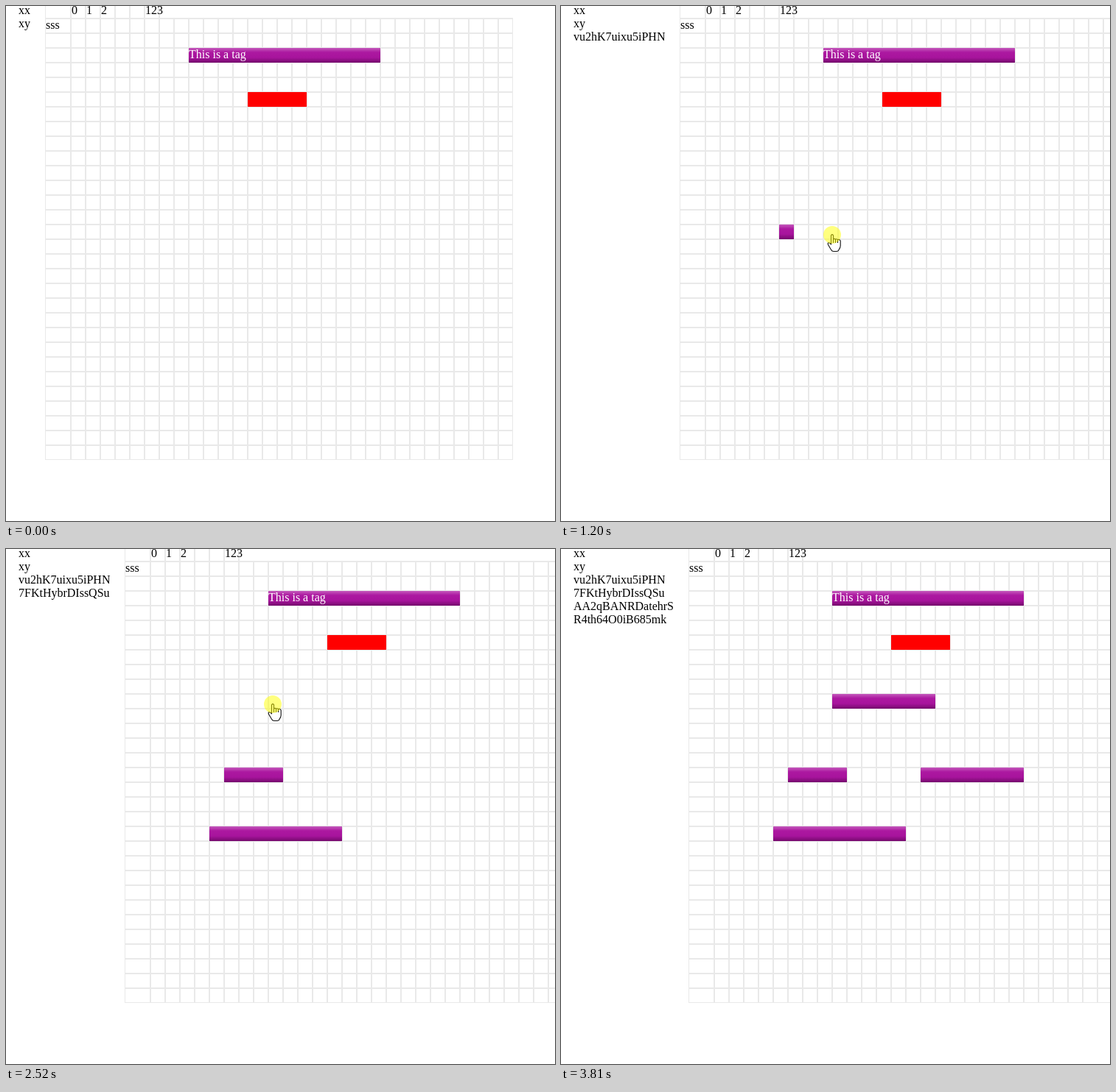
Write an HTML page that moves like this. It is 745 px wide and 700 px high and loops after 4210 ms.

```html
<!DOCTYPE html>
<html lang="en">
<head>
<meta charset="utf-8">
<title>Tag grid</title>
<style>
  html, body { margin: 0; width: 100%; height: 100%; overflow: hidden; background: #fff; }
  svg { display: block; }
  text { font: 16px "Liberation Serif", "Times New Roman", serif; white-space: pre; }
  #lines { fill: none; stroke: #e9e9e9; stroke-width: 2; }
  .tag { fill: url(#purple); }
  .cursor { fill: #fff; stroke: #111; stroke-width: 1.1; stroke-linejoin: round; stroke-linecap: round; }
</style>
</head>
<body>
<svg id="stage" width="745" height="700">
  <defs>
    <linearGradient id="purple" x2="0" y2="1">
      <stop offset="0" stop-color="#c45abc"/>
      <stop offset=".3" stop-color="#ac18a0"/>
      <stop offset=".65" stop-color="#a8149d"/>
      <stop offset="1" stop-color="#750a6d"/>
    </linearGradient>
  </defs>

  <g id="names">
    <text x="17" y="11">xx</text>
    <text x="17" y="29">xy</text>
  </g>

  <g id="table">
    <svg x="53" y="-3" width="635" height="620"><path id="lines"/></svg>
    <text x="89" y="11">0</text>
    <text x="109" y="11">1</text>
    <text x="129" y="11">2</text>
    <text x="189" y="11">123</text>
    <text x="54" y="31">sss</text>
    <rect class="tag" x="248" y="57" width="260" height="20"/>
    <text x="248" y="71" fill="#fff">This is a tag</text>
    <rect x="328" y="117" width="80" height="20" fill="#f00"/>
  </g>

  <g id="pointer">
    <g id="hand" class="cursor" transform="translate(0 -1)">
      <path d="M-1.5 1.8q1.5-2.4 3 0V7q1.6-1.4 3 .2q1.6-1.2 3 .5q1.9-1 3.7 1.3V16q-.2 2.6-1.8 4.6q-1 2.9-3.4 2.9H2q-2.4 0-3.5-2.3L-5.2 15q-1.3-2.6 .1-3.2q1.5-.4 3.6 2.2z"/>
      <path fill="none" d="M1.5 7v4.5M4.5 7.2v4.3M7.5 7.7v3.8"/>
    </g>
    <path id="arrow" class="cursor" d="M.5 .5v16l3.8-3.6l2.4 5.6l2.3-1l-2.4-5.4h5z"/>
    <circle id="press" r="12" fill="#ff0" fill-opacity=".5"/>
  </g>
</svg>

<script>
const LOOP = 4210, START = 344, STEP = 77, LAST = 45;
const CELL = 20, LEFT = 88, TOP = 17, BOTTOM = 617;
const HOLD = 3;   // steps from press to release
const $ = id => document.getElementById(id);

// Press at step `down`, drag from x to `to`; the bar shows up at step `born`
const drags = [
  { down: 8, born: 11, x: 206, to: 368, y: 311, name: 'vu2hK7uixu5iPHN' },
  { down: 19, born: 20, x: 281, to: 443, y: 395, name: '7FKtHybrDIssQSu' },
  { down: 28, born: 29, x: 362, to: 493, y: 211, name: 'AA2qBANRDatehrS' },
  { down: 35, born: 36, x: 492, to: 620, y: 301, name: 'R4th64O0iB685mk' }
];

function add(parent, type, attrs) {
  const el = document.createElementNS('http://www.w3.org/2000/svg', type);
  for (const key in attrs) el.setAttribute(key, attrs[key]);
  return parent.appendChild(el);
}

const snap = (v, origin) => origin + Math.floor((v - origin) / CELL) * CELL;

// The name column grows with its widest name and pushes the table right
const shift = step => Math.max(0, ...drags.filter(d => d.born <= step).map(d => d.grow));

function drawGrid() {
  let d = 'M0 0V620';
  for (let i = 0; i <= 30; i++) d += `M${35 + i * CELL} ${i > 6 ? CELL : 0}V620`;
  for (let i = 1; i <= 31; i++) d += `M0 ${i * CELL}H635`;
  $('lines').setAttribute('d', d);
}

function addDrags() {
  const base = $('names').firstElementChild.getComputedTextLength();
  drags.forEach((drag, i) => {
    drag.label = add($('names'), 'text', { x: 17, y: 47 + 18 * i });
    drag.label.textContent = drag.name;
    drag.grow = Math.round(drag.label.getComputedTextLength() - base);
  });
  for (const drag of drags) {
    drag.left = snap(drag.x - shift(drag.down), LEFT);
    drag.bar = add($('table'), 'rect', { class: 'tag', x: drag.left, y: snap(drag.y, TOP), height: CELL });
  }
}

// Cursor path: glide to each press, then drag along the row, then leave
function buildLegs() {
  const legs = [];
  let at = [437, 512], start = 0;
  for (const { down, x, to, y } of drags) {
    legs.push({ start, end: down - 2, a: at, b: [x, y], power: 2 });
    start = down + HOLD;
    at = [to, y];
    legs.push({ start: down, end: start, a: [x, y], b: at, power: 3 });
  }
  legs.push({ start, end: LAST, a: at, b: [691, 689], power: 2 });
  return legs;
}

function cursorAt(step) {
  const { start, end, a, b, power } = legs.filter(leg => leg.start <= step).pop();
  const k = Math.min(1, (step - start) / (end - start));
  const eased = 1 - (1 - k) ** power;
  return a.map((v, i) => Math.round(v + (b[i] - v) * eased));
}

// The bar covers whole cells and follows the cursor one step late
function barWidth(drag, step) {
  if (step === drag.born) return CELL;
  const last = Math.min(step, drag.down + HOLD + 1);
  return snap(cursorAt(last - 1)[0] - shift(last), LEFT) + CELL - drag.left;
}

const show = (el, on) => el.setAttribute('visibility', on ? 'visible' : 'hidden');

function draw(step) {
  $('table').setAttribute('transform', `translate(${shift(step)} 0)`);
  for (const drag of drags) {
    const on = step >= drag.born;
    show(drag.bar, on);
    show(drag.label, on);
    if (on) drag.bar.setAttribute('width', barWidth(drag, step));
  }
  const visible = step >= 0 && step < LAST;
  const [x, y] = cursorAt(Math.max(0, step));
  $('pointer').setAttribute('transform', `translate(${x} ${y})`);
  show($('hand'), visible && y < BOTTOM);
  show($('arrow'), visible && y >= BOTTOM);
  show($('press'), drags.some(d => step >= d.down && step <= d.down + HOLD));
}

drawGrid();
addDrags();
const legs = buildLegs();

let shown;
function frame() {
  const t = performance.now() % LOOP;
  const step = Math.max(-1, Math.min(LAST, Math.floor((t - START) / STEP)));
  if (step !== shown) draw(shown = step);
  requestAnimationFrame(frame);
}
frame();
</script>
</body>
</html>
```
